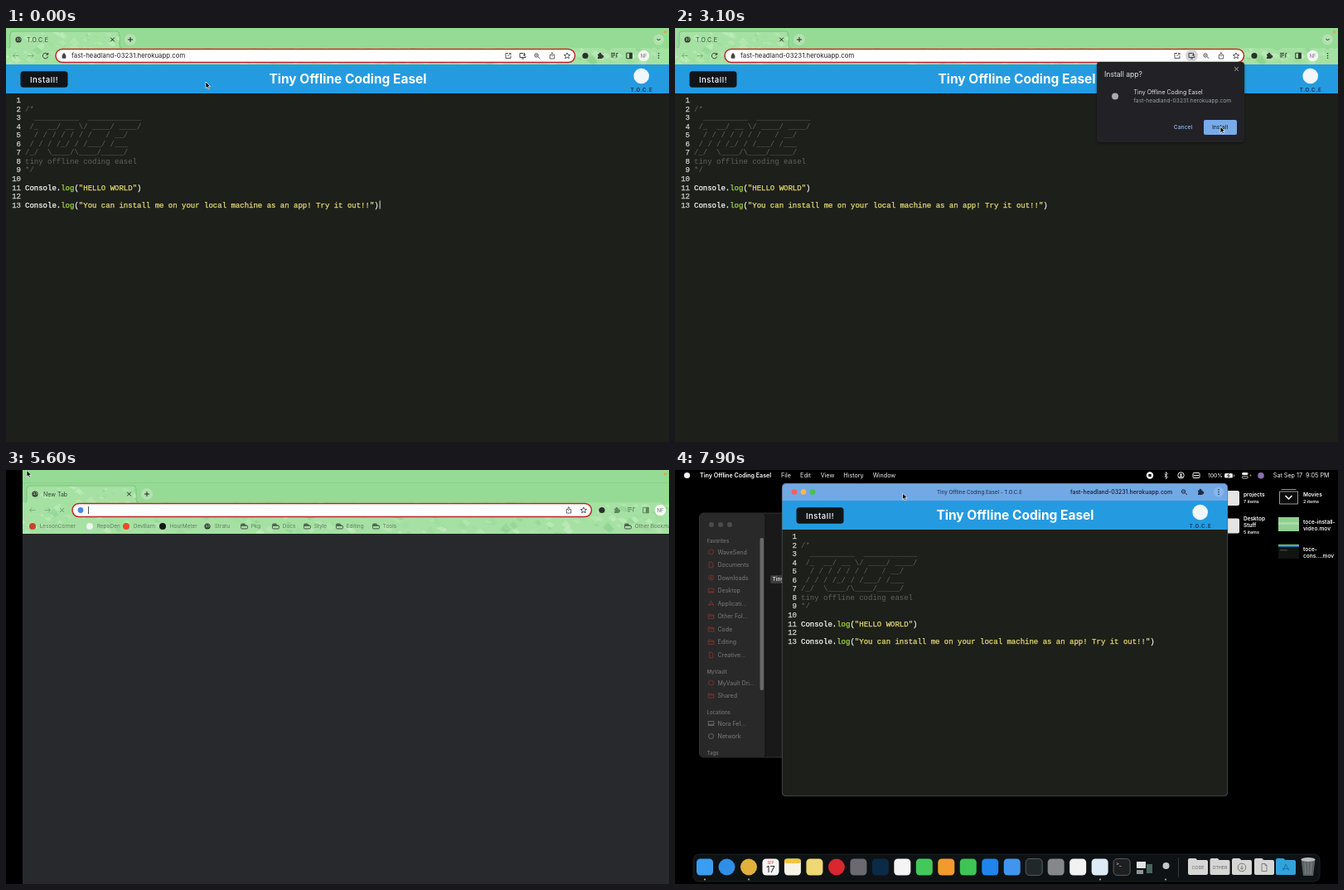
These frames come from a looping animation (800x500 px, 8 s). An HTML page:

```html
<!DOCTYPE html>
<html lang="en">
<head>
<meta charset="utf-8">
<title>T.O.C.E</title>
<style>
html, body { margin: 0; width: 100%; height: 100%; overflow: hidden; background: #000; }
svg { display: block; width: 800px; height: 500px; }
text { font-family: Inter, "Open Sans", sans-serif; white-space: pre; }
.code text { font: 9px "Liberation Mono", monospace; }
.code .bright { paint-order: stroke; stroke-width: .25px; }
</style>
</head>
<body>
<svg id="stage" viewBox="0 0 800 500"></svg>
<script>
const LOOP = 8000, STEP = 100;
const NAME = 'Tiny Offline Coding Easel', SHORT = 'T.O.C.E';
const URL_TEXT = 'fast-headland-03231.herokuapp.com';

// Drawing helpers
const esc = s => s.replace(/&/g, '&amp;').replace(/</g, '&lt;');
const text = (x, y, s, size, fill, more = '') =>
  `<text x="${x}" y="${y}" font-size="${size}" fill="${fill}" ${more}>${esc(s)}</text>`;
const rect = (x, y, w, h, fill, r = 0, more = '') =>
  `<rect x="${x}" y="${y}" width="${w}" height="${h}" rx="${r}" fill="${fill}" ${more}/>`;
const dot = (x, y, r, fill, more = '') => `<circle cx="${x}" cy="${y}" r="${r}" fill="${fill}" ${more}/>`;
const icon = (x, y, d, color = '#333', fill = 'none', width = 1) =>
  `<path transform="translate(${x} ${y})" d="${d}" fill="${fill}" stroke="${color}" stroke-width="${width}"/>`;
const group = (id, body, more = '') => `<g id="${id}" ${more}>${body}</g>`;
const MID = 'text-anchor="middle"', BOLD = 'font-weight="600"';

const folder = (x, y, w, h, c) =>
  `<path fill="${c}" d="M${x} ${y + 2}q0-2 2-2h${w * .3}l2 2h${w * .7 - 6}q2 0 2 2v${h - 6}q0 2-2 2h${4 - w}q-2 0-2-2z"/>`;

const ICON = {
  cross: 'M-2.3-2.3L2.3 2.3M2.3-2.3L-2.3 2.3',
  plus: 'M-3 0H3M0-3V3',
  back: 'M3.5 0H-3.5M-.5-3L-3.5 0L-.5 3',
  next: 'M-3.5 0H3.5M.5-3L3.5 0L.5 3',
  reload: 'M2.6-1.8A3.2 3.2 0 1 0 3.1 1M3.2-3.6V-1.3H.8',
  open: 'M0-3H-3V3H3V0M1-3H3V-1M3-3L-.5.5',
  install: 'M1-3H-3.5V2H3.5V.5M-1.5 3.5H1.5M2-3.5V0M.4-1.4L2 .2L3.6-1.4',
  zoom: 'M1.2-.5A2.2 2.2 0 1 1-3.2-.5A2.2 2.2 0 1 1 1.2-.5M.8 1L3.4 3.5M-2-.5H0',
  share: 'M-1-1H-2.7V3.5H2.7V-1H1M0 1V-3.8M-1.6-2.3L0-3.9L1.6-2.3',
  star: 'M0-3.6L1.1-1.2L3.7-1L1.7.7L2.3 3.3L0 1.9L-2.3 3.3L-1.7.7L-3.7-1L-1.1-1.2Z',
  puzzle: 'M-3-2H-1.2A1.2 1.2 0 1 1 1-2H2.6V-.2A1.2 1.2 0 1 1 2.6 2V3.6H-3V1.8A1.2 1.2 0 0 0-3-.4Z',
  list: 'M-4-3H1M-4-.8H1M-4 1.4H-1M2.8 2V-3H4.4',
  panel: 'M-3.3-3.3H3.3V3.3H-3.3Z',
  chevron: 'M-2-1L0 1L2-1',
  lock: 'M-2-.4H2V2.8H-2ZM-1.2-.4V-1.5A1.2 1.2 0 0 1 1.2-1.5V-.4',
  circle: 'M-3 0A3 3 0 1 1 3 0A3 3 0 1 1-3 0',
  file: 'M-2.3-3.3H.8L2.3-1.6V3.3H-2.3Z',
  down: 'M-3 0A3 3 0 1 1 3 0A3 3 0 1 1-3 0M0-1.6V1.5M-1.2.4L0 1.6L1.2.4',
  screen: 'M-3.3-2.5H3.3V2.5H-3.3ZM-3.3 1.2H3.3',
  apps: 'M-3 3L0-3L3 3M-3.4 1.2H3.4',
  folder: 'M-3.3-2.6H-.8L0-1.7H3.3V2.6H-3.3ZM-3.3-.6H3.3',
};
const dots = (x, y, c) => [-2.8, 0, 2.8].map(d => dot(x, y + d, .8, c)).join('');
const globe = (x, y) => dot(x, y, 3.6, '#30382f') +
  icon(x, y, 'M-2-1.8L0-.8L-.6 1L-2.2.6M1-2.6L2.4-.6L1 1.6', '#b5dfb2', 'none', .8);

// Mottled green browser theme
function leaves(y0, h, count) {
  let seed = 7, out = '';
  const rnd = () => (seed = seed * 16807 % 2147483647) / 2147483647;
  for (let i = 0; i < count; i++) {
    const x = rnd() * 800, y = y0 + rnd() * h, r = 2 + rnd() * 5;
    const color = ['#8ad28a', '#bcebb8', '#c9f0c5', '#9bdc9a'][i % 4];
    out += `<path fill="${color}" opacity=".55" d="M${x - r} ${y}L${x} ${y - r * rnd()}L${x + r} ${y + r * .3}L${x + r * .2} ${y + r * .8}Z"/>`;
  }
  return out;
}

function browserBar(title, h, fresh) {
  const faint = '#79b279';
  let s = rect(0, -20, 800, h + 20, '#95da95') + rect(0, 24, 800, h - 24, '#a5e1a3') +
    `<path d="M3 24Q5 24 5 21V8Q5 4 9 4H133Q137 4 137 8V21Q137 24 140 24" fill="#a5e1a3" stroke="#72b274" stroke-width=".7"/>` +
    `<g clip-path="url(#bar${h})">${leaves(5, h - 5, 340)}</g>` +
    globe(15, 14) + text(25, 16.5, title, 7, '#30402f', fresh ? '' : 'letter-spacing=".3"') +
    icon(128.5, 14, ICON.cross, '#222') +
    dot(150, 14, 7, '#b2e2af') + icon(150, 14, ICON.plus, '#222') +
    dot(787.5, 14, 6.5, '#b2e2af') + icon(787.5, 14, ICON.chevron, '#222') +
    icon(12, 33.5, ICON.back, faint) + icon(30, 33.5, ICON.next, faint) +
    icon(47.5, 33.5, fresh ? ICON.cross : ICON.reload, fresh ? '#5f8f5f' : '#333') +
    rect(60, 25.5, 626.5, 16, '#fff', 8, 'stroke="#bd2521" stroke-width="1.5"');
  if (fresh) {
    s += dot(70, 33.5, 3.4, '#4285f4') + rect(79, 29, .8, 9, '#222');
  } else {
    s += icon(70, 33.5, ICON.lock, '#444', '#444', .8) + text(79, 36.3, URL_TEXT, 7.8, '#222') +
      group('glow', dot(623.5, 33.5, 7.5, '#d5d7da')) +
      icon(606, 33.5, ICON.open, '#555') + icon(623.5, 33.5, ICON.install, '#444') + icon(641, 33.5, ICON.zoom, '#555');
  }
  const dim = fresh ? '#5d865d' : '#333';
  s += icon(659, 33.5, ICON.share, '#555', 'none', .9) + icon(677, 33.5, ICON.star, '#444', 'none', .9) +
    dot(699, 33.5, 3.6, '#2b2f2b') + icon(717, 33.5, ICON.puzzle, 'none', dim) +
    icon(734, 33.5, ICON.list, dim) + icon(752, 33.5, ICON.panel, dim) + rect(752, 30, 3.3, 7, dim) +
    dot(769.5, 33.5, 6.8, '#f4f6f3') + text(769.5, 35.7, 'NF', 6, '#777', MID) + dots(787.5, 33.5, dim);
  return s;
}

// Editor page, laid out for a given width
const ART = String.raw`
/*
  __________  ____________
 /_  __/ __ \/ ____/ ____/
  / / / / / / /   / __/
 / / / /_/ / /___/ /___
/_/  \____/\____/_____/
tiny offline coding easel
*/

HELLO WORLD

You can install me on your local machine as an app! Try it out!!`.split('\n');

function page(w, h, id) {
  let s = rect(0, 0, w, h, '#1d1f1a') + rect(0, 0, w, 35, '#249be1') +
    rect(17.5, 8.3, 57, 19.5, '#121518', 3.5, `id="${id}"`) +
    text(46, 21.6, 'Install!', 9.5, '#fff', `${MID} font-weight="500" letter-spacing=".55"`) +
    text(w / 2 + 12.5, 23.3, NAME, 15.5, '#fff', `${MID} font-weight="700"`) +
    dot(w - 33.3, 14, 9.3, '#f2f7fb') +
    text(w - 33, 32.8, SHORT, 6, '#19385c', `${MID} font-weight="700" letter-spacing=".7"`);
  let code = '';
  ART.forEach((line, i) => {
    const y = 46 + i * 10.55;
    code += text(18, y, String(i + 1), 9, '#d5d5cf', 'text-anchor="end" class="bright" stroke="#d5d5cf"');
    if (i > 9 && line) {
      const part = (c, str) => `<tspan fill="${c}" stroke="${c}">${str}</tspan>`;
      code += `<text class="bright" x="23" y="${y}">` + part('#f8f8f2', 'Console.') + part('#a0d83a', 'log') +
        part('#f8f8f2', '(') + part('#e6db74', `"${line}"`) + part('#f8f8f2', ')') + '</text>';
    } else if (line) code += text(23, y, line, 9, '#62635a');
  });
  return s + `<g class="code">${code}</g>`;
}

function popup() {
  return rect(509, 41, 178, 97, '#202226', 4, 'filter="url(#shade)"') +
    icon(677.5, 49.5, ICON.cross, '#c6c8cb', 'none', .9) +
    text(518, 59, 'Install app?', 8.6, '#e6e8ea') +
    dot(531, 82.5, 4, '#a7abad') +
    text(553.5, 79.5, NAME, 7, '#e6e8ea') + text(553.5, 90, URL_TEXT, 6.7, '#9a9ea3') +
    text(613, 122.4, 'Cancel', 6.8, '#8ab4f8', `${MID} font-weight="500"`) +
    rect(638, 111, 40, 18, '#78abea', 2) + text(657.5, 122.4, 'Install', 6.8, '#202b3c', `${MID} font-weight="500"`);
}

function bookmarks() {
  const links = [[12, 'LessonCorner', '#c5452f'], [81, 'RepoDen', '#eef5ec'], [125, 'DevBarn', '#f04a26'],
    [169, 'HourMeter', '#141614'], [223, 'Stratu', '']];
  const folders = [[267, 'Pkg'], [305, 'Docs'], [343, 'Style'], [382, 'Editing'], [426, 'Tools'], [730, 'Other Bookmarks']];
  return links.map(([x, s, c]) => (c ? dot(x, 53, 4, c) : globe(x, 53)) + text(x + 8.7, 55.3, s, 6.5, '#627e62')).join('') +
    folders.map(([x, s]) => folder(x - 4, 49.5, 9, 7, '#4f6a4f') + rect(x - 3, 53, 7, 2.3, '#a5e1a3') +
      text(x + 8.7, 55.3, s, 6.5, '#627e62')).join('');
}

function menuBar() {
  const items = [[134, 'File'], [157.5, 'Edit'], [184, 'View'], [215.5, 'History'], [252.5, 'Window']];
  return dot(14.5, 6.5, 3.6, '#f2f2f2') + text(30, 9.2, NAME, 7.1, '#fff', BOLD) +
    items.map(([x, s]) => text(x, 9.2, s, 7.2, '#f2f2f2', MID)).join('') +
    dot(573, 6.5, 4.2, '#fff') + rect(571.4, 4.9, 3.2, 3.2, '#000') +
    icon(592.5, 6.5, 'M-2-2L2 2L0 4V-4L2-2L-2 2', '#eee', 'none', .8) +
    dot(610.5, 6.5, 3.7, 'none', 'stroke="#eee"') + dot(610.5, 5.7, 1.2, '#eee') + rect(608.5, 7.5, 4, 1.6, '#eee', 1) +
    rect(625, 3.5, 8, 6, 'none', 1, 'stroke="#eee"') + rect(626, 6, 6, 1, '#eee') +
    text(643, 9.1, '100%', 6.8, '#f2f2f2') +
    rect(663, 4, 10, 5.4, '#e8e8e8', 1.5) + icon(668, 6.7, 'M.8-2.3L-1.3.3H1.3L-.8 2.3', '#000', 'none', .8) + rect(674, 5.5, 1, 2.5, '#aaa') +
    rect(684, 3, 7.5, 3, '#e8e8e8', 1.5) + rect(684.4, 7.4, 6.8, 2.6, 'none', 1.3, 'stroke="#e8e8e8" stroke-width=".8"') + dot(694.5, 6.5, .9, '#e88b28') +
    dot(707, 6.7, 3.8, '#8a6fae') +
    text(789.5, 9.2, 'Sat Sep 17  9:05 PM', 7.2, '#f2f2f2', 'text-anchor="end"');
}

function finder() {
  const head = (y, s) => text(38.5, y + 2.2, s, 6, '#6d6d6d', BOLD);
  const row = (y, s, d, c = '#8a3632') => icon(43.5, y, ICON[d], c, 'none', .8) + text(51.5, y + 2.5, s, 7, '#7c7c7c');
  const favs = [['WaveSend', 'circle'], ['Documents', 'file'], ['Downloads', 'down'], ['Desktop', 'screen'],
    ['Applicati…', 'apps'], ['Other Fol…', 'folder'], ['Code', 'folder'], ['Editing', 'folder'], ['Creative…', 'file']];
  return rect(29.5, 52, 330, 295, '#191919', 5, 'stroke="#444" stroke-width=".7"') +
    rect(30, 52.5, 79, 294, '#292929', 5) + rect(108.5, 53, .7, 293, '#0c0c0c') +
    [44, 55, 66].map(x => dot(x, 66, 3, '#4c4c4c')).join('') +
    rect(102.5, 82, 4.5, 184, '#686868', 2.2) +
    head(86, 'Favorites') + favs.map(([s, d], i) => row(99 + i * 15.55, s, d)).join('') +
    head(244, 'MyVault') + row(257, 'MyVault Dri…', 'circle') + row(272.5, 'Shared', 'folder') +
    head(293, 'Locations') + row(306, 'Nora Fel…', 'screen', '#777') +
    group('tagsA', head(326, 'Tags') + dot(43.5, 339, 2.8, '#b13b37') + text(51.5, 341.5, 'Red', 7, '#7c7c7c')) +
    group('tagsB', row(321.5, 'Network', 'circle', '#777') + head(342, 'Tags')) +
    rect(115, 127, 44, 10, '#3b3b3b', 2) + text(117.5, 134.4, NAME, 6.6, '#dedede', BOLD);
}

function desktopFiles() {
  const label = (x, y, a, b, size = 5.4) => text(x, y, a, 6.5, '#fff', BOLD) + text(x, y + 8, b, size, '#eee', BOLD);
  return folder(656, 23, 25, 20, '#e4e4e4') + label(686, 31.7, 'projects', '7 items') +
    folder(656, 56.5, 25, 20, '#e4e4e4') + text(686, 61.3, 'Desktop', 6.5, '#fff', BOLD) + label(686, 69.2, 'Stuff', '5 items') +
    icon(740.5, 33, 'M-11-7H11V8H-11ZM-9-9.5H9', '#bbb', '#0d0d0d', .8) + icon(740.5, 33, 'M-4-2L0 2L4-2', '#fff', 'none', 1.5) +
    label(758, 31.7, 'Movies', '2 items') +
    rect(728, 57, 25, 17, '#8fcf8f') + rect(728, 63, 25, 3, '#a9dca7') + label(758, 65, 'toce-install-', 'video.mov', 6.5) +
    rect(728, 90, 25, 17, '#111411') + rect(728, 90, 25, 1.5, '#8fce90') + rect(728, 91.5, 25, 1.3, '#249be1') +
    rect(730, 96, 9, 1.5, '#3c4238') + label(758, 98.2, 'toce-', 'cons….mov', 6.5);
}

function dock() {
  const at = i => 36 + i * 26.48;
  const tiles = ['#3a9df0', '#2f8fe8', '#e0b13b', '#f5f5f5', '#f6f3e6', '#efd874', '#d9262f', '#6a6a70', '#0b2a45',
    '#f4f4f4', '#43c85a', '#f39a2c', '#3fc453', '#1f84ec', '#4295ee', '#20282a', '#85878b', '#f1f1f1', '#dcebf5', '#1d1f20'];
  const round = [1, 2, 6], outlined = [15, 19];
  let s = rect(22, 464, 756, 33, '#0e1214', 7, 'stroke="#252b2f" stroke-width=".7"');
  tiles.forEach((c, i) => {
    const x = at(i), edge = outlined.includes(i) ? 'stroke="#777" stroke-width=".7"' : '';
    s += round.includes(i) ? dot(x, 479.5, 10, c) : rect(x - 10, 469.5, 20, 20, c, 4.5, edge);
  });
  s += text(at(3), 475.5, 'SEP', 4.3, '#d33', MID) + text(at(3), 486, '17', 11, '#222', MID) +
    rect(at(4) - 10, 469.5, 20, 5.5, '#f2c63c', 2.5) +
    text(at(19) - 7, 478, '>_', 6, '#ddd') +
    rect(557, 473, 11, 8, '#dfe4e4') + rect(557, 483, 8, 5, '#8e9695') + rect(569, 476, 7, 11, '#49665b') +
    dot(592.5, 478, 4, '#c4c7c7') + rect(607, 468, .8, 24, '#3b4246');
  [631, 657.5, 684, 711].forEach(x => s += folder(x - 12, 469, 24, 20, '#d6d7d5'));
  s += folder(725, 469, 24, 20, '#33a2db') +
    text(631, 481.5, 'CODE', 5.4, '#666', MID) + text(657.5, 481.5, 'OTHER', 5.4, '#666', MID) +
    dot(684, 480, 4.8, 'none', 'stroke="#777"') + icon(684, 480, 'M0-2.5V2.3M-1.8.5L0 2.4L1.8.5', '#777') +
    icon(711, 480, 'M-3-4.5H1L3-2.5V4.5H-3ZM1-4.5V-2.5H3', '#777', 'none', .9) +
    icon(737, 480, 'M-3.5 4L0-4L3.5 4M-4 1.5H4', '#1776aa') +
    `<path d="M755.5 470H772.5L770 490H758Z" fill="#5d6365"/><ellipse cx="764" cy="470.5" rx="8.5" ry="2.5" fill="#b8bcbd"/>` +
    icon(764, 480, 'M-4-6L-3 8M0-6V8M4-6L3 8', '#8b9092', 'none', .8);
  [36, 89, 513, 592].forEach(x => s += dot(x, 494.5, .9, '#c5cacc'));
  return s;
}

function appWindow() {
  return `<g clip-path="url(#win)">` + rect(0, 0, 538, 378, '#72a8e6') +
    ['#f4605a', '#f6bd3e', '#43c645'].map((c, i) => dot(15 + i * 11, 10.5, 3.3, c)).join('') +
    text(238.5, 12.8, `${NAME} - ${SHORT}`, 6.3, '#1c2b3d', MID) +
    text(348, 12.8, URL_TEXT, 6.9, '#15202d', 'font-weight="500"') +
    icon(485.5, 10.5, ICON.zoom, '#1c2b3d') + icon(505, 10.5, ICON.puzzle, 'none', '#1c2b3d') +
    dot(527, 10.5, 6, '#88b7eb') + dots(527, 10.5, '#1c2b3d') +
    `<g transform="translate(0 21)">` + group('wide', page(800, 358, 'b1')) + group('fit', page(538, 358, 'b2')) + '</g></g>' +
    rect(.3, .3, 537.4, 377.4, 'none', 5, 'stroke="#5c6061" stroke-width=".6"');
}

const stage = document.getElementById('stage');
stage.innerHTML = `<defs>
  <clipPath id="bar44"><path d="M5 24V5H137V24H800V44H0V24Z"/></clipPath>
  <clipPath id="bar62"><path d="M5 24V5H137V24H800V62H0V24Z"/></clipPath>
  <clipPath id="win"><rect width="538" height="378" rx="5"/></clipPath>
  <filter id="shade"><feDropShadow dx="0" dy="1" stdDeviation="1.5" flood-opacity=".5"/></filter>
  </defs>` + rect(0, 0, 800, 500, '#000') +
  group('web', browserBar(SHORT, 44) + `<g transform="translate(0 44)">${page(800, 456, 'button')}</g>` +
    group('caret', rect(450.7, 208.5, .9, 10, '#f8f8f2')) + group('popup', popup())) +
  group('fresh', rect(0, 0, 800, 500, '#28292c') + group('bar', browserBar('New Tab', 62, true) + bookmarks() +
    rect(0, 0, 800, .6, '#88c988'))) +
  group('desk', desktopFiles() + finder() + group('app', appWindow()) + menuBar() + dock()) +
  group('spark', dot(795.5, 4.8, 1.7, '#eda13a')) +
  group('cursor', group('arrow', icon(0, 0, 'M0 0V7.8L1.8 6.1L3 8.8L4.4 8.2L3.2 5.6H5.6Z', '#fff', '#000', .7)) +
    group('beam', icon(0, 0, 'M-2-4.5Q0-4.5 0-3V3Q0 4.5-2 4.5M2-4.5Q0-4.5 0-3V3Q0 4.5 2 4.5M-1 1.3H1', '#e9e9e9', 'none', .9)));

// Motion: [time, x, y]
const POINTER = [[0, 241, 65], [1100, 66, 60], [1300, 58, 57], [1900, 58, 57], [2900, 656, 118], [3100, 658, 119],
  [3500, 658, 119], [4300, 623.5, 118.5], [4800, 623.5, 118.5], [5100, 300, 40], [5300, 25, .5], [6600, 25, .5],
  [6700, 127.5, 85], [6900, 127.5, 85], [7500, 262.5, 47], [7800, 274.5, 28]];
const WINDOW = [[0, 117, 35], [7500, 117, 35], [7800, 129, 16]];
const HOLDS = [[4300, 4900], [5100, 5300], [5300, 5500], [5600, 6700], [6900, 7100]];

function along(keys, t) {
  const i = keys.findIndex(k => k[0] > t);
  if (i < 0) return keys[keys.length - 1].slice(1);
  const [a, b] = [keys[i - 1], keys[i]];
  const p = (t - a[0]) / (b[0] - a[0]), e = p * p * (3 - 2 * p);
  return [a[1] + (b[1] - a[1]) * e, a[2] + (b[2] - a[2]) * e];
}

const $ = id => document.getElementById(id);
const show = (id, on) => $(id).style.display = on ? '' : 'none';
const move = (id, x, y) => $(id).setAttribute('transform', `translate(${x} ${y})`);

function draw(now) {
  let t = Math.floor(now % LOOP / STEP) * STEP;
  const hold = HOLDS.find(([a, b]) => t >= a && t < b);
  if (hold) t = hold[0];
  const web = t < 4900, desk = t >= 6700;
  const asking = t >= 1600 && t < 3500;
  const [x, y] = along(POINTER, t);

  show('web', web);
  show('fresh', !web && !desk);
  show('desk', desk);
  show('spark', !desk);
  show('popup', asking);
  show('glow', asking);
  show('caret', t < 1500 && t % 1000 < 500);
  $('button').setAttribute('fill', x > 17 && x < 75 && y > 52 && y < 72 ? '#4d4d4d' : '#121518');

  move('fresh', t >= 5600 ? 20 : t >= 5500 ? 6 : 0, 0);
  move('bar', 0, t >= 5300 ? 15 : 0);
  move('app', ...along(WINDOW, t));
  show('wide', t < 6800);
  show('fit', t >= 6800);
  show('tagsA', t < 6800);
  show('tagsB', t >= 6800);

  const typing = web && y > 79 && !(asking && x > 509 && x < 687 && y < 138);
  move('cursor', x, y);
  show('arrow', !typing);
  show('beam', typing);
}

const start = performance.now();
function tick() {
  draw(performance.now() - start);
  requestAnimationFrame(tick);
}
tick();
</script>
</body>
</html>
```
